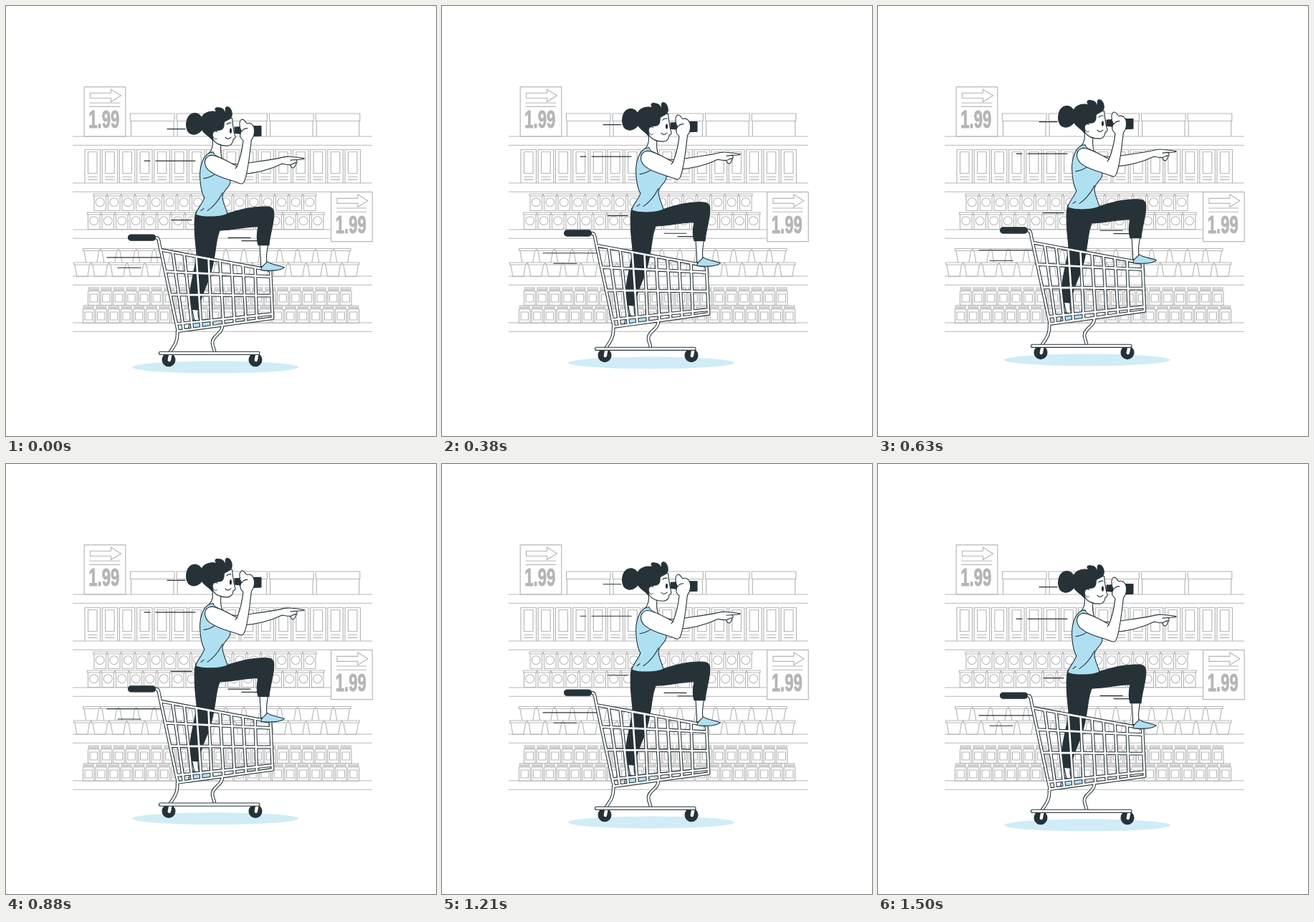
An HTML page that plays this animation: 600x600 px, repeating every 1.54 s.

```html
<!DOCTYPE html>
<html lang="en">
<head>
<meta charset="utf-8">
<title>Supermarket lookout</title>
<style>
  html, body { margin: 0; height: 100%; overflow: hidden; background: #fff; }
  svg { display: block; width: 100vw; height: 100vh; }
  .shop { fill: none; stroke: #b6b6b6; stroke-width: 1.15; }
  .tag { fill: #fff; }
  .price { font: bold 35px "Liberation Sans", Arial, sans-serif; fill: #b5b5b5; stroke: #b5b5b5; stroke-width: 1; text-anchor: middle; }
  .ink { fill: #263238; }
  .line { fill: none; }
  .skin { fill: #fff; }
  .blue { fill: #aee0f2; }
  #rider { stroke: #263238; stroke-width: 1.1; stroke-linecap: round; stroke-linejoin: round; }
  .pipe { fill: none; stroke-width: 4.7; }
  .core { fill: none; stroke: #fff; stroke-width: 2.6; }
  .fork { fill: none; stroke: #fff; stroke-width: 4.4; }
</style>
</head>
<body>
<svg viewBox="0 0 600 600">
  <defs>
    <g id="tag">
      <path class="tag" d="M109.2 112.9h57.6v68.9h-57.6z"/>
      <path d="M117.5 121.5H146.5V116.2L160.5 125L146.5 133.6V128.5H117.5ZM116.5 135.2H159M116.5 140.4H159"/>
      <text class="price" transform="translate(136.8 169.800) scale(.63 1)">1.99</text>
    </g>
  </defs>

  <g class="shop">
    <path id="goods"/>
    <use href="#tag"/>
    <use href="#tag" x="344.4" y="146.8"/>
  </g>

  <g id="rider">
    <ellipse cx="292" cy="504.3" rx="116" ry="8.4" fill="#cfecf7" stroke="none"/>
    <path class="line" d="M225 172H250M193 216.5H201M209 216.5H264M231 299H259M310 323.7H341M329 328H354M141 351.2H216M156 365.6H188"/>

    <!-- pointing arm -->
    <path class="skin" d="M303 217C315 221 328 222 337 219.5C354 217 370 215 383 212.2C387 210.7 392 210.2 397 210.6C404 211 411 212 416 213C417 214.2 410 214.8 404 214.8C407 216 406.5 218 405 220C404 223 403 226 400.5 226.3C397.5 226.5 398 223 396 221.8C391 222 388 221 385 220.5C370 228 353 233.5 326 235Z"/>
    <path class="line" d="M397 215.5L404 214.8M396 221.8C399 222.5 400 219 405 219"/>

    <!-- standing leg -->
    <path class="skin" d="M259 420L263 440L272 442C267 437 267 430 269 420Z"/>
    <path class="blue" d="M254.5 450L256 443C258 438 262 437 267 440C274 443 284 439 288.5 442C290 445 287 447 279 447.5C270 449.5 262 450 254.5 450Z"/>
    <path class="skin" d="M354 330C354 342 356 352 355.5 364L365 363C362 352 364 344 366 330Z"/>
    <path class="ink" d="M265 288C262 298 263 320 266 345C265 365 257 386 256.5 405C256 413 257 419 258 423.5L268 424.5C270 414 276 398 282 384C288 369 291 350 293 335C294 326 296 319 298 313.5C318 313 334 308 352 308C350 317 349 325 352 334H367C368 321 372 310 373.5 296C374.5 287 374 281 365 280.5C344 279 325 285 309 290Z"/>

    <!-- neck and shirt -->
    <path class="skin" d="M288 182C289 192 289 200 283 206L291 214L302 214C299 207 299 201 300 192Z"/>
    <path class="blue" d="M284 205C275 210 271 223 270.5 236C271 250 273 262 277 268C273 278 266 284 264.7 291.5C276 296 299 295 309 290.5C307 282 302 274 302 266C303 256 313 254 313 245L312 236L297 211C293 210 290 208 289 204Z"/>
    <path class="line" d="M276 241C284 240 290 237 295 232M281 286C290 280 297 271 302 261M272 286L276 283"/>

    <!-- head -->
    <path class="skin" d="M287 168L289 187C293 193 301 195.5 309 195.5C315 195 317 190 317 186.5C319 186.5 321 184 319.500 181C317.5 176 317 169 315.5 157L300 155Z"/>
    <path class="ink" d="M273 156C276 149 286 145.5 295 148.5C289 144 293 141 298 142.5C302 143 305 146 306 150C308 147 304 143 308 141.2C314 141 316.5 150 314.5 155C312 160 306 159 304 163C305 171 301 174 296 173.5C290 175 287 179 287.5 187C284 182 277 179 273.5 173C265 183 254 181 252 170C250 158 256 150 264 150C268 150 271 153 273 156Z"/>
    <path class="skin" stroke-width=".9" d="M295 176C290 173 287 178 289 183C290.5 186 293 187 294.5 185"/>
    <ellipse class="ink" cx="313.5" cy="174.5" rx="1" ry="3"/>
    <path class="line" d="M308 165.5Q310 163 314 163.5M306 183.5Q309 188 314 183.5"/>

    <!-- binoculars and near arm -->
    <path class="ink" d="M319 169.5L330 169L344 168L356 168V181.5L343 182L330 179L319 177.5Z"/>
    <path class="skin" d="M287 208.5C299 210 314 220 322.5 224C327 212 330 199 331 188C326 184 326 179 328.5 175C325 169 325 160 329 158.5C333 158 333 162 336 164C342 162 346 167 346.5 173C347 179 345 184 342.5 187C340 206 338 232 332.5 245C331 249 328 249 324 247C310 242 292 238 282 229C275 221 276 210 287 208.5Z"/>
    <path class="line" d="M322.5 224L320 227M329 175C331 172 334 171 337 171"/>

    <!-- cart -->
    <path class="pipe wire"/>
    <path class="core wire"/>
    <rect class="ink" x="170.5" y="319.3" width="38" height="8.2" rx="4"/>
    <path class="blue" d="M356 369C355 364 361 362 364.5 357C369 361 380 362 388.5 365C384 369.5 370 370.5 356 369Z"/>
    <g id="wheel">
      <circle class="ink" cx="227" cy="494" r="9"/>
      <path class="fork" d="M229.3 487L227.8 494.5"/>
    </g>
    <use href="#wheel" x="121"/>
    <rect class="skin" x="213.5" y="482.6" width="140.5" height="4.2" rx="2"/>
  </g>
</svg>
<script>
const rect = (x, y, w, h) => `M${x} ${y}h${w}v${h}h${-w}z`;
const ring = (x, y, r) => `M${x - r} ${y}a${r} ${r} 0 1 0 ${2 * r} 0a${r} ${r} 0 1 0 ${-2 * r} 0`;
const row = (count, x, pitch, item) =>
  Array.from({ length: count }, (_, i) => item(x + i * pitch)).join('');

const carton = x => rect(x, 150, 61.5, 10.5) + rect(x + 1, 160.5, 59.5, 21.5);
const pack = x => rect(x, 200.5, 21.5, 46.5) + rect(x + 4.5, 203.5, 12.5, 30) +
  `M${x + 4} 238.5h13.5M${x + 4} 242.3h13.5`;
const tin = y => x => rect(x, y, 18.5, 3) + rect(x + 1, y + 3, 16.5, 20.5) + ring(x + 9.2, y + 11.7, 6);
const cup = y => x => rect(x, y, 23.5, 3) + `M${x + 1.5} ${y + 3}l2.8 16.5h15l2.8 -16.5`;
const jar = y => x => rect(x + 1, y, 13.5, 3.5) + `M${x + 2} ${y + 2}h11.5` +
  rect(x, y + 5, 15.5, 19.5) + rect(x + 2.5, y + 9, 10.5, 11);

const shelves = [182, 247, 312, 377, 442].map(y => `M93 ${y}H511m0 12.2H93`).join('');
document.getElementById('goods').setAttribute('d', shelves +
  row(5, 173.5, 64.7, carton) + row(16, 110, 24.2, pack) +
  row(16, 122, 19.5, tin(262)) + row(17, 113.5, 19.5, tin(288)) +
  row(15, 107.5, 25, cup(338.5)) + row(16, 94.5, 25, cup(358)) +
  row(21, 114.5, 17.6, jar(393)) + row(22, 107.5, 17.6, jar(418)));

// Basket bars run between the top and bottom rails.
const tops = [232.5, 248.5, 265.5, 282.5, 298.5, 314.5, 330.5, 347.5];
const feet = [248, 260, 272.5, 287, 303.5, 319, 335, 350];
const bars = tops.map((x, i) =>
  `M${x} ${341 + (x - 218) * .185}L${feet[i]} ${454 - (feet[i] - 240) * .136}`).join('');
const frame = 'M209 323.5C214 323.5 213 330 215 337L240 454L372 436L369 369L218 341' +
  'M224 371L369.5 378M230 403L371 404.5M237.5 444L372 430' +
  'M239 455C240 467 236 473 229 483M302 446C302 458 288 460 288 470C288 476 291 478 291 483';
document.querySelectorAll('.wire').forEach(p => p.setAttribute('d', bars + frame));

const rider = document.getElementById('rider');
const LOOP = 1540, FLOAT = 1500, LEAD = 20, LIFT = 12;
const start = performance.now();
function draw(now) {
  const t = (Math.max(0, now - start) % LOOP + LEAD) % FLOAT;
  const lift = LIFT * (1 - Math.abs(1 - 2 * t / FLOAT));
  rider.setAttribute('transform', `translate(0 ${-lift})`);
  requestAnimationFrame(draw);
}
draw(start);
</script>
</body>
</html>
```
